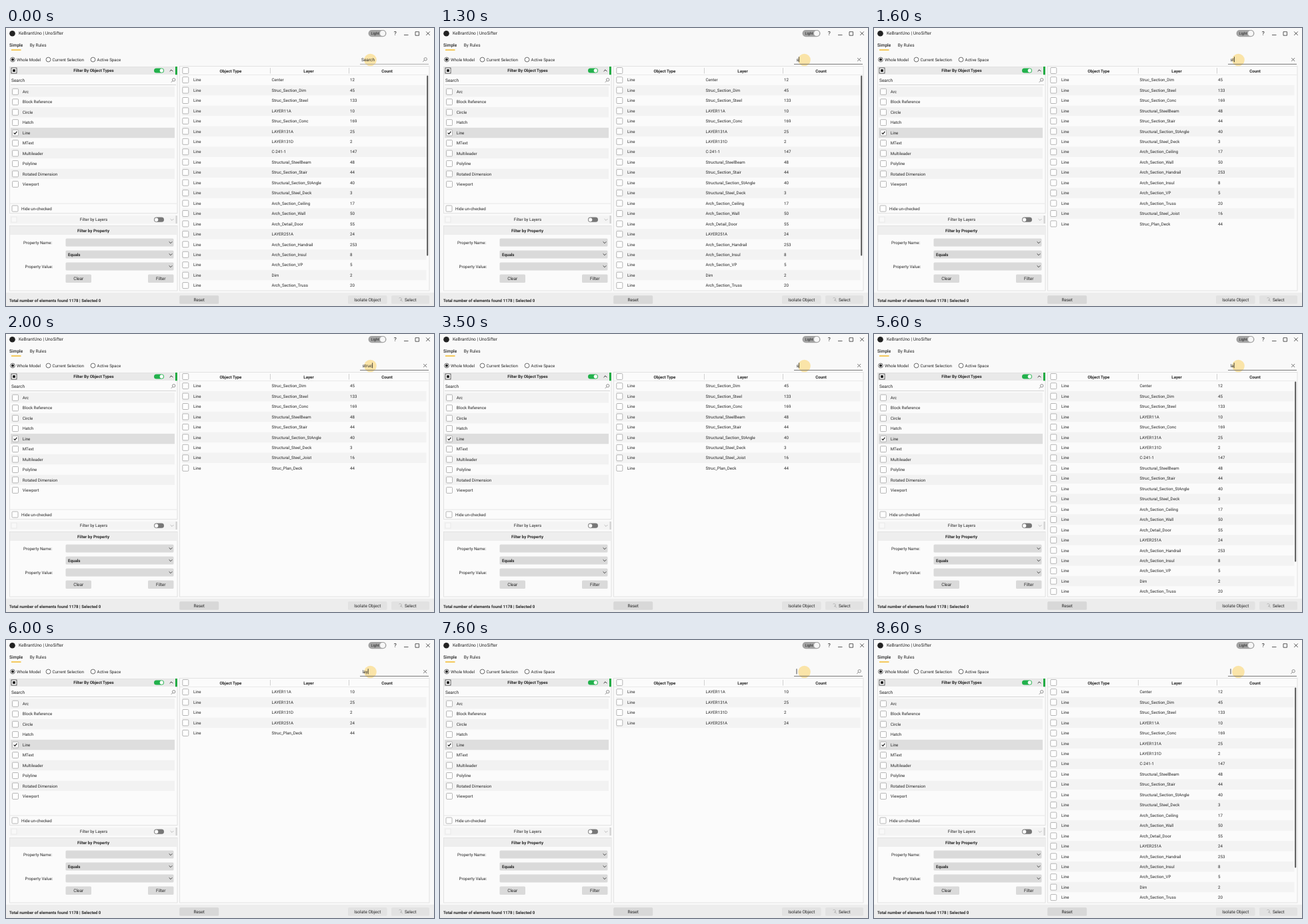
An HTML page that plays this animation: 642 px wide and 418 px high, repeating every 9000 ms.

```html
<!DOCTYPE html>
<html lang="en">
<head>
<meta charset="utf-8">
<title>Layer filter</title>
<style>
  html, body { margin: 0; width: 100%; height: 100%; overflow: hidden; background: #f9f9f9; }
  svg { display: block; width: 642px; height: 418px; }
  text {
    font-family: Roboto, "Open Sans", sans-serif;
    fill: #262626;
    text-rendering: geometricPrecision;
    white-space: pre;
  }
</style>
</head>
<body>
<svg id="stage" viewBox="0 0 642 418" xmlns="http://www.w3.org/2000/svg"></svg>
<script>
const LOOP = 9000;
const PITCH = 15.45;
const stage = document.getElementById('stage');

function add(parent, tag, attrs, content) {
  const el = document.createElementNS('http://www.w3.org/2000/svg', tag);
  for (const key in attrs) el.setAttribute(key, attrs[key]);
  if (content !== undefined) el.textContent = content;
  parent.appendChild(el);
  return el;
}
const group = () => add(stage, 'g', {});
const rect = (x, y, width, height, fill, more, parent = stage) =>
  add(parent, 'rect', { x, y, width, height, fill, ...more });
const circle = (cx, cy, r, fill, more) =>
  add(stage, 'circle', { cx, cy, r, fill, ...more });
const line = (d, stroke = '#333', width = 0.8, parent = stage) =>
  add(parent, 'path', { d, stroke, 'stroke-width': width, fill: 'none' });

// y is the vertical middle of the capitals
function label(x, y, content, { size = 6.2, parent = stage, ...more } = {}) {
  return add(parent, 'text', { x, y: y + size * 0.36, 'font-size': size, ...more }, content);
}
const bold = { 'font-weight': 700 };
const mid = { 'text-anchor': 'middle' };

function checkbox(cx, cy, parent = stage, stroke = '#a2a2a2') {
  rect(cx - 4.5, cy - 4.5, 9, 9, '#fff', { rx: 1.2, stroke, 'stroke-width': 0.8 }, parent);
}
function toggle(x, y, fill, on) {
  rect(x, y - 3.6, 15, 7.2, fill, { rx: 3.6 });
  circle(on ? x + 11.4 : x + 3.6, y, 2.7, '#fff');
}
function magnifier(cx, cy, parent = stage) {
  add(parent, 'circle', { cx: cx + 0.7, cy: cy - 0.7, r: 2.2, fill: 'none', stroke: '#666', 'stroke-width': 0.7 });
  line(`M${cx - 0.9} ${cy + 0.9}l-2.2 2.2`, '#666', 0.8, parent);
}
function chevron(cx, cy, dir, stroke, width = 1) {
  line(`M${cx - 2.4} ${cy - dir * 1.2}l2.4 ${dir * 2.4}l2.4 ${-dir * 2.4}`, stroke, width);
}
function button(x, y, w, h, name, fill = '#dadada', ink = '#333') {
  rect(x, y, w, h, fill, { rx: 1.5 });
  if (name) label(x + w / 2, y + h / 2, name, { size: 6.55, fill: ink, ...mid });
}
function dropdown(y, value) {
  button(89.5, y - 6, 162, 12);
  chevron(247, y, 1, '#333', 0.9);
  if (value) label(93, y, value, bold);
}

function titleBar() {
  circle(9.5, 8.2, 4.3, '#222');
  label(19, 8, 'KeBrantUno | UnoSifter', { size: 6.6 });
  rect(543.5, 3, 27, 10.2, '#a3a3a3', { rx: 5.1 });
  label(547.5, 8.1, 'Light', { size: 5.6, fill: '#fff' });
  circle(565, 8.1, 4, '#f7f7f7');
  label(583.8, 8.3, '?', { size: 8.5, ...mid });
  line('M597 10.5h6.5');
  line('M614 5.7h5.5v5.5h-5.5z');
  line('M630.2 5.4l5.6 5.6m0 -5.6l-5.6 5.6');
  label(5, 25.7, 'Simple', { size: 6.6, 'font-weight': 500 });
  label(35.8, 25.7, 'By Rules', { size: 6.5 });
  rect(8, 32.3, 14.5, 1.4, '#f2b61c');
  [[10, 'Whole Model'], [63.5, 'Current Selection'], [130.5, 'Active Space']].forEach(([x, name], i) => {
    circle(x, 47.5, 3.4, '#fff', { stroke: '#444', 'stroke-width': 0.8 });
    if (!i) circle(x, 47.5, 1.9, '#111');
    label(x + 6.1, 47.6, name);
  });
}

function typesPanel() {
  rect(5.5, 58.5, 251.5, 220, '#fbfbfb', { stroke: '#dcdcdc', 'stroke-width': 0.8 });
  rect(6, 59, 248, 11, '#e9e9e9');
  rect(254, 58, 2.8, 12.3, '#16a83a');
  rect(8, 60, 8, 8, '#fff', { stroke: '#333', 'stroke-width': 0.8 });
  rect(10.1, 62.1, 3.8, 3.8, '#111');
  label(131.5, 64.1, 'Filter By Object Types', { ...bold, ...mid });
  toggle(222, 64, '#22b14c', true);
  chevron(248, 64, -1, '#333');
  label(8, 78.5, 'Search', { size: 6.55, fill: '#666' });
  magnifier(251, 78.5);
  line('M7 85.5h248', '#c4c4c4', 0.7);

  const types = ['Arc', 'Block Reference', 'Circle', 'Hatch', 'Line', 'MText',
    'Multileader', 'Polyline', 'Rotated Dimension', 'Viewport'];
  types.forEach((name, i) => {
    const y = 95.8 + i * PITCH;
    const chosen = name === 'Line';
    if (i % 2 === 0) rect(7, y - PITCH / 2, 246, PITCH, chosen ? '#dedede' : '#f2f2f2');
    checkbox(14, y);
    if (chosen) line(`M11.7 ${y}l1.7 1.8l3 -3.7`, '#111', 1.1);
    label(24.8, y, name);
  });
  line('M6 264h250', '#dcdcdc', 0.7);
  checkbox(13.5, 271.5);
  label(23, 271.6, 'Hide un-checked');
}

function lowerPanels() {
  rect(5.5, 282.5, 251.5, 11.5, '#f4f4f4');
  rect(254.5, 282, 2.3, 12, '#d2d2d2');
  rect(8, 284, 8, 8, '#f8f8f8', { stroke: '#e6e6e6', 'stroke-width': 0.7 });
  label(131.5, 288.2, 'Filter by Layers', { fill: '#c3c3c3', ...mid });
  toggle(222, 288.2, '#777', false);
  chevron(249, 288.2, 1, '#bbb');

  rect(5.5, 297.5, 251.5, 97.5, '#fbfbfb', { stroke: '#dcdcdc', 'stroke-width': 0.8 });
  rect(6, 298, 250.5, 13, '#eee');
  label(131, 304.6, 'Filter by Property', { ...bold, ...mid });
  label(26, 322.6, 'Property Name:');
  label(28.5, 358.6, 'Property Value:');
  dropdown(322.5);
  dropdown(340.5, 'Equals');
  dropdown(358.5);
  button(89.5, 370.5, 38.5, 12.5, 'Clear');
  button(213, 370.5, 38.5, 12.5, 'Filter');
}

function tableFrame() {
  rect(260.5, 57.5, 374.5, 337.5, '#fbfbfb', { stroke: '#dcdcdc', 'stroke-width': 0.8 });
  line('M261 70.5h373', '#e2e2e2', 0.7);
  line('M396.5 60v8.5M514.5 60v8.5', '#c8c8c8', 0.8);
  checkbox(269.3, 64);
  [[337, 'Object Type'], [454, 'Layer'], [571.5, 'Count']].forEach(([x, name]) =>
    label(x, 64.3, name, { ...bold, ...mid }));
}

function footer() {
  rect(0, 398, 642, 20, '#ededed');
  label(5, 409.3, 'Total number of elements found 1178 | Selected 0', { size: 6.13, ...bold });
  button(260.2, 402.3, 59, 12.4, 'Reset', '#d8d8d8');
  button(513, 402.3, 58.5, 12.4, 'Isolate Object', '#e2e2e2', '#b4b4b4');
  button(578, 402.3, 57, 12.4, '', '#e2e2e2');
  line('M589.5 406.2a2.2 2.2 0 1 1 1.6 3.7M592 408l2.6 3.4', '#aaa', 0.8);
  label(598, 408.6, 'Select', { size: 6.45, fill: '#a2a2a2' });
}

const layers = [
  ['Center', 12], ['Struc_Section_Dim', 45], ['Struc_Section_Steel', 133], ['LAYER11A', 10],
  ['Struc_Section_Conc', 169], ['LAYER131A', 25], ['LAYER131D', 2], ['C-241-1', 147],
  ['Structural_SteelBeam', 48], ['Struc_Section_Stair', 44], ['Structural_Section_StAngle', 40],
  ['Structural_Steel_Deck', 3], ['Arch_Section_Ceiling', 17], ['Arch_Section_Wall', 50],
  ['Arch_Detail_Door', 55], ['LAYER251A', 24], ['Arch_Section_Handrail', 253],
  ['Arch_Section_Insul', 8], ['Arch_Section_VP', 5], ['Dim', 2], ['Arch_Section_Truss', 20],
  ['Structural_Steel_Joist', 16], ['Struc_Plan_Deck', 44]
];
const VISIBLE = 21;

// [start time, value]
const typed = [[0, ''], [1300, 's'], [1600, 'st'], [1700, 'str'], [1800, 'stru'], [2000, 'struc'],
  [3200, 'stru'], [3300, 'str'], [3400, 'st'], [3500, 's'], [3600, ''],
  [5400, 'l'], [5500, 'la'], [5900, 'lay'], [7200, 'la'], [7400, 'l'], [7600, '']];
const queries = [[0, ''], [1600, 's'], [2000, 'struc'], [3900, ''], [5800, 'la'], [6200, 'lay'], [7900, '']];
const caretOn = [[0, false], [500, true], [1000, false], [1300, true], [2600, false], [3000, true],
  [4200, false], [4600, true], [5200, false], [5400, true], [6600, false], [7100, true],
  [8200, false], [8600, true]];
const valueAt = (track, t) => track.filter(([start]) => start <= t).pop()[1];

titleBar();
typesPanel();
lowerPanels();
tableFrame();
const rows = group();
footer();

circle(546.5, 48, 9.3, '#f9dc8c', { opacity: 0.75 });
const underline = line('M531 54.4h103');
const hint = label(533, 47.6, 'Search', { size: 6.55, fill: '#777' });
const entry = label(534.5, 47.6, '', { size: 6.5 });
const caret = rect(535, 43.3, 0.8, 8, '#222');
const lens = group();
magnifier(628.5, 47.5, lens);
const clear = line('M626.2 45l5 5m0 -5l-5 5', '#555', 0.8);

const show = (el, on) => el.setAttribute('visibility', on ? 'visible' : 'hidden');

function fillTable(query) {
  rows.replaceChildren();
  const found = layers.filter(([name]) => name.toLowerCase().includes(query));
  found.slice(0, VISIBLE).forEach(([name, count], i) => {
    const y = 78.1 + i * PITCH;
    if (i % 2) rect(264, y - PITCH / 2, 366.5, PITCH, '#f3f3f3', {}, rows);
    checkbox(269.3, y, rows);
    label(281, y, 'Line', { parent: rows });
    label(398.5, y, name, { parent: rows });
    label(516, y, count, { parent: rows });
  });
  if (found.length > VISIBLE) rect(631.2, 71.5, 2, 271, '#555', { rx: 1 }, rows);
}

let lastQuery, lastText;
function draw(now) {
  const t = now % LOOP;
  const query = valueAt(queries, t);
  const text = valueAt(typed, t);
  if (query !== lastQuery) fillTable(lastQuery = query);
  if (text !== lastText) {
    entry.textContent = lastText = text;
    caret.setAttribute('x', 534.6 + (text ? entry.getComputedTextLength() : 0));
    show(lens, !text);
    show(clear, text);
  }
  show(hint, t < 500);
  show(caret, valueAt(caretOn, t));
  underline.setAttribute('stroke', t < 500 ? '#999' : '#555');
}
function tick() {
  draw(performance.now());
  requestAnimationFrame(tick);
}
tick();
</script>
</body>
</html>
```
